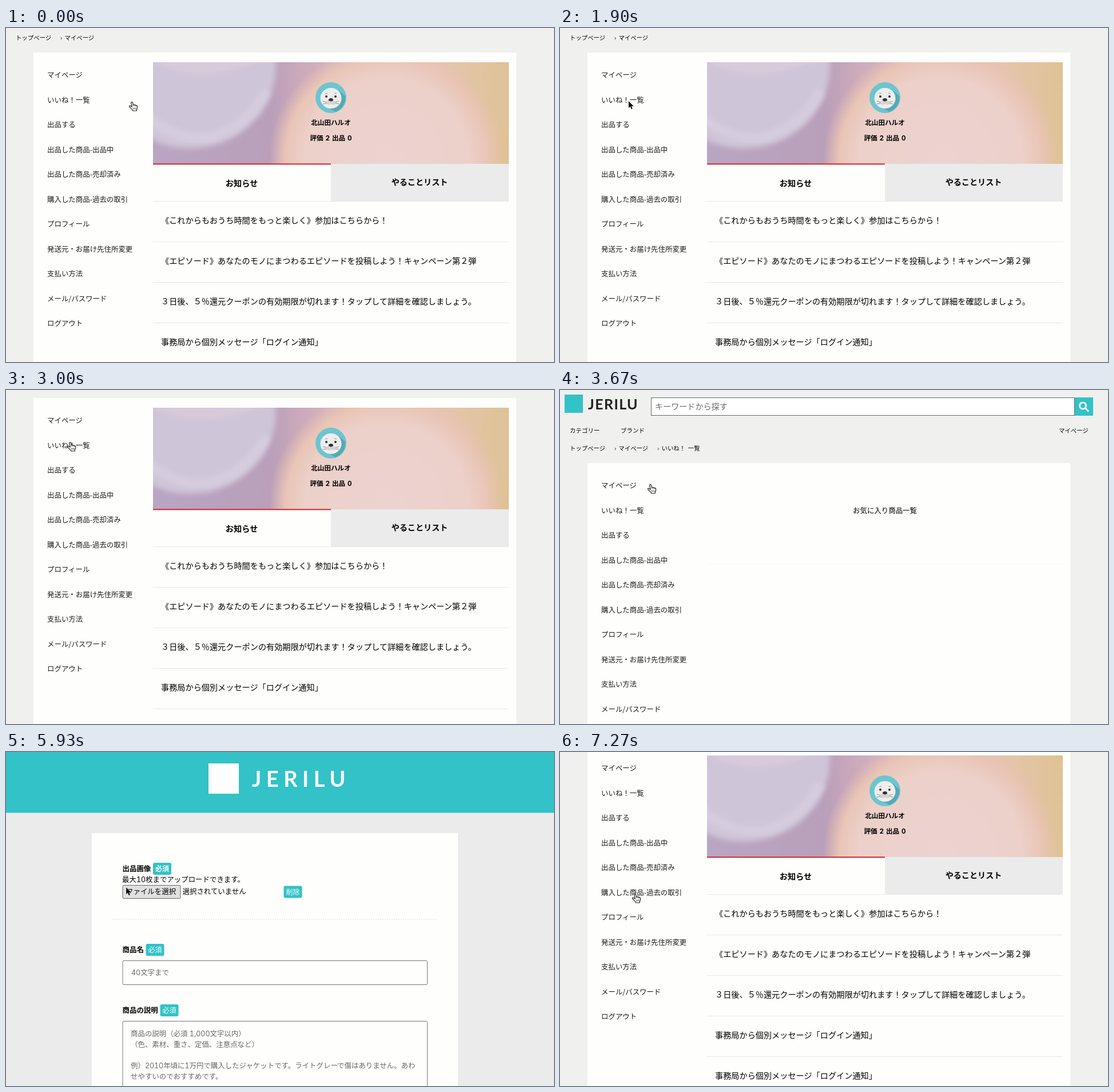
Recreate the animation shown at these times as an HTML page. Size 958 by 585 pixels, loop 7310 ms.

```html
<!DOCTYPE html>
<html lang="ja">
<head>
<meta charset="utf-8">
<title>マイページ</title>
<style>
  html, body { margin: 0; width: 100%; height: 100%; overflow: hidden; background: #f0f0ef; }
  svg { display: block; width: 958px; height: 585px; }
  text { font-family: "Noto Sans CJK JP", "Noto Sans CJK", sans-serif; text-spacing-trim: space-all; white-space: pre; }
  .num { font-family: Inter, "Noto Sans CJK JP", sans-serif; font-variant-numeric: tabular-nums; }
  .brand { font-family: Lato, sans-serif; font-weight: 700; }

  #site, #cursor { animation: 7310ms ease-in-out infinite; }
  #home, #likes, #sell, #unpainted, #hand, #arrow { animation: 7310ms step-end infinite; }
  #site { animation-name: scroll; }
  #cursor { animation-name: pointer; }
  #home { animation-name: home; }
  #likes { animation-name: likes; }
  #sell { animation-name: sell; }
  #unpainted { animation-name: unpainted; }
  #hand { animation-name: hand; }
  #arrow { animation-name: arrow; }

  @keyframes scroll {
    0%, 26% { transform: translateY(-85px); }
    29.1%, 43.1% { transform: translateY(-114px); }
    43.11%, 58.1% { transform: translateY(0); }
    61.3% { transform: translateY(-85px); }
    64.3%, 93% { transform: translateY(-113px); }
    98.5%, 100% { transform: translateY(-139px); }
  }
  @keyframes pointer {
    0% { transform: translate(220px, 130px); }
    13.7%, 21.2% { transform: translate(118px, 75px); }
    26%, 30.5% { transform: translate(120px, 128px); }
    36.9%, 43.8% { transform: translate(112px, 92px); }
    49.2%, 51.3% { transform: translate(158px, 166px); }
    53.4%, 58.1% { transform: translate(130px, 160px); }
    65.7%, 75.2% { transform: translate(100px, 140px); }
    80%, 86.9% { transform: translate(210px, 237px); }
    94.4%, 100% { transform: translate(131px, 249px); }
  }
  @keyframes home {
    0%, 54.7% { visibility: visible; }
    43.1% { visibility: hidden; }
  }
  @keyframes likes {
    0%, 54.7% { visibility: hidden; }
    43.1% { visibility: visible; }
  }
  @keyframes sell {
    0%, 86.9% { visibility: hidden; }
    75.2% { visibility: visible; }
  }
  @keyframes unpainted {
    0%, 30.1% { visibility: hidden; }
    26.2% { visibility: visible; }
  }
  @keyframes hand {
    0%, 34.2%, 88.9% { visibility: visible; }
    25.3%, 75.2% { visibility: hidden; }
  }
  @keyframes arrow {
    0%, 34.2%, 88.9% { visibility: hidden; }
    25.3%, 75.2% { visibility: visible; }
  }
</style>
</head>
<body>
<svg id="stage" viewBox="0 0 958 585"></svg>
<script>
const TEAL = '#32c2c7', PAPER = '#fefefd', GREY = '#ebebec', LINE = '#e9e9ee';

// Text placed by its left edge and vertical middle
const text = (x, mid, size, str, attrs = '') =>
  `<text x="${x}" y="${(mid + size * 0.38).toFixed(2)}" font-size="${size}" ${attrs}>${str}</text>`;
const rect = (x, y, w, h, fill, attrs = '') =>
  `<rect x="${x}" y="${y}" width="${w}" height="${h}" fill="${fill}" ${attrs}/>`;
const medium = 'font-weight="500"';
const bold = 'font-weight="700"';
const centred = bold + ' text-anchor="middle"';

const menu = ['マイページ', 'いいね！一覧', '出品する', '出品した商品-出品中', '出品した商品-売却済み',
  '購入した商品-過去の取引', 'プロフィール', '発送元・お届け先住所変更', '支払い方法',
  'メール/パスワード', 'ログアウト'];
const login = '事務局から個別メッセージ「ログイン通知」';
const news = ['《これからもおうち時間をもっと楽しく》参加はこちらから！',
  '《エピソード》あなたのモノにまつわるエピソードを投稿しよう！キャンペーン第２弾',
  '３日後、５％還元クーポンの有効期限が切れます！タップして詳細を確認しましょう。',
  login, login];

const header = `
  ${rect(8, 8, 32, 32, TEAL)}
  <text class="brand" x="49" y="34" font-size="25" letter-spacing="1.4" fill="#222">JERILU</text>
  ${rect(159.5, 13.5, 740, 31, '#fff', 'stroke="#666"')}
  ${text(166, 29, 14.1, 'キーワードから探す', 'fill="#6c6c6c"')}
  ${rect(900, 13, 32, 32, TEAL)}
  <g fill="none" stroke="#fff" stroke-width="2.8"><circle cx="914" cy="27.5" r="5.6"/><path d="M918 31.5L924 37.5"/></g>
  ${text(17, 71, 10.5, 'カテゴリー', medium)}
  ${text(106, 71, 10.5, 'ブランド', medium)}
  ${text(872, 71, 10.4, 'マイページ', medium)}
  ${text(17, 102, 10.4, 'トップページ', medium)}
  ${text(95, 102, 10.4, '›', medium)}
  ${text(102.5, 102, 10.4, 'マイページ', medium)}`;

const sidebar = menu.map((s, i) => text(72, 167.3 + i * 43.5, 12.45, s, 'fill="#1c1c1c"')).join('');

const banner = `
  <g clip-path="url(#bannerClip)">
    ${rect(257, 145, 622, 178, 'url(#bannerBase)')}
    <circle cx="665" cy="315" r="205" fill="url(#peach)"/>
    <ellipse cx="322" cy="152" rx="150" ry="144" fill="#cfc5d8" filter="url(#blur)"/>
    <path d="M240 130Q330 200 470 130V90H240Z" fill="#d8cada" filter="url(#blur)"/>
    <path d="M245 240Q300 282 350 278Q420 262 455 195" fill="none" stroke="#d5cddf" stroke-width="16" filter="url(#blur)"/>
  </g>`;

const avatar = `
  <g transform="translate(568 207)">
    <circle r="27" fill="#6cc5cf"/>
    <path d="M14 -12L25 -3A26 26 0 0 1 8 25L-9 15Z" fill="#54aab6"/>
    <ellipse cy="1" rx="18.5" ry="18" fill="#eeeeec"/>
    <g fill="#333">
      <circle cx="-8" cy="-2" r="2"/><circle cx="8" cy="-2" r="2"/>
      <ellipse cy="4" rx="4" ry="3"/>
    </g>
    <ellipse cx="-4" cy="9" rx="5" ry="3.6" fill="#d5d4d2"/><ellipse cx="4" cy="9" rx="5" ry="3.6" fill="#d5d4d2"/>
    <path d="M-8 8L-14 6M-8 10L-14 11M8 8L14 6M8 10L14 11M-10 -7L-6 -8M10 -7L6 -8" stroke="#777" stroke-width=".8"/>
  </g>`;

const home = `
  ${banner}${avatar}
  ${text(568, 250.5, 11.6, '北山田ハルオ', centred)}
  ${text(568, 277.5, 11.6, '評価 2 出品 0', centred + ' class="num" word-spacing=".8"')}
  ${rect(568, 323, 311, 66, GREY)}
  ${rect(257, 322.3, 311, 2, '#d3262c')}
  ${text(412, 357, 14.2, 'お知らせ', centred)}
  ${text(723, 355, 14.1, 'やることリスト', centred)}
  ${news.map((s, i) => rect(257, 388 + i * 71, 622, 1, LINE) + text(271, 422 + i * 71, 14.16, s)).join('')}
  ${rect(257, 743, 622, 1, LINE)}`;

const likes = `
  ${text(170, 102, 10.4, '›', medium)}
  ${text(177.5, 102, 10.4, 'いいね！ 一覧', medium + ' word-spacing="2.4"')}
  ${text(512, 211, 12.45, 'お気に入り商品一覧', medium)}
  ${rect(257, 304, 622, 1, '#f8f9ea')}`;

const badge = (x, y, str, attrs = '') =>
  rect(x, y, 32, 21, TEAL, 'rx="3"') + text(x + 16, y + 10.5, 12, str, 'fill="#fff" text-anchor="middle" ' + attrs);
const hint = (x, mid, str) => text(x, mid, 12.45, str, 'class="num" fill="#686868"');

const sell = `
  ${rect(0, 0, 958, 585, GREY)}
  ${rect(0, 0, 958, 106.5, TEAL)}
  ${rect(354, 20, 53, 53, '#fff')}
  <text class="brand" x="430" y="61" font-size="38" letter-spacing="8.5" fill="#fff">JERILU</text>
  ${rect(150, 142, 640, 443, PAPER)}
  ${text(203.5, 204, 12.45, '出品画像', bold)}${badge(257, 194, '必須', bold)}
  ${text(203, 223, 12.45, '最大10枚までアップロードできます。', 'class="num"')}
  ${rect(204, 233.5, 101, 23, '#e0e0e0', 'rx="2" stroke="#666"')}
  ${text(210, 244.5, 12.45, 'ファイルを選択')}
  ${text(308.5, 244.5, 12.45, '選択されていません')}${badge(485.5, 234.5, '削除')}
  <path d="M186 293H755" stroke="#dcdce2" stroke-dasharray="2 2"/>
  ${text(203.5, 346.5, 12.45, '商品名', bold)}${badge(244.5, 336, '必須')}
  ${rect(204, 365.5, 532.5, 42, PAPER, 'rx="2" stroke="#777"')}
  ${hint(219, 386, '40文字まで')}
  ${text(203.5, 452, 12.45, '商品の説明', bold)}${badge(269.5, 442, '必須')}
  ${rect(204, 471.5, 532.5, 160, PAPER, 'rx="2" stroke="#777"')}
  ${hint(218, 493.5, '商品の説明（必須 1,000文字以内）')}
  ${hint(218, 512, '（色、素材、重さ、定価、注意点など）')}
  ${hint(218, 549.5, '例）2010年頃に1万円で購入したジャケットです。ライトグレーで傷はありません。あわ')}
  ${hint(218, 568, 'せやすいのでおすすめです。')}`;

const cursor = `
  <g id="hand">
    <path d="M-1.3 1.2C-1.5-.6 1-.9 1.5.8L2.6 5C3 3.9 5 4 5.2 5.2C5.8 4.4 7.4 4.7 7.6 6C8.4 5.6 9.5 6.2 9.6 7.4C9.8 10 9.2 11.5 8.4 12.6L8.3 15H1.6L1.4 13.6C-.6 12-2.2 9.8-4 8.2C-5.2 7-3.8 5.6-2.3 6.4L.3 8.2Z"
      fill="#fff" stroke="#222" stroke-width="1.2" stroke-linejoin="round"/>
    <path d="M2.6 5L3 7.2M5.2 5.2L5.5 7.2M7.6 6L7.7 7.6M2.6 9.5V12.5M4.7 9.5V12.5M6.7 9.5V12.5" stroke="#222" stroke-width=".8"/>
  </g>
  <path id="arrow" d="M0 0V12.2L2.8 9.6 4.8 14.2 6.9 13.3 4.9 8.9H8.7Z" fill="#111" stroke="#fff" stroke-width="1" paint-order="stroke"/>`;

document.getElementById('stage').innerHTML = `
  <defs>
    <clipPath id="bannerClip">${rect(257, 145, 622, 178, '#000')}</clipPath>
    <filter id="blur"><feGaussianBlur stdDeviation="5"/></filter>
    <linearGradient id="bannerBase">
      <stop offset="0" stop-color="#b9a6c2"/><stop offset=".33" stop-color="#b99fba"/>
      <stop offset=".42" stop-color="#cdaabb"/><stop offset=".6" stop-color="#dfbec0"/>
      <stop offset=".82" stop-color="#e4c6ae"/><stop offset="1" stop-color="#dfc295"/>
    </linearGradient>
    <radialGradient id="peach">
      <stop offset="0" stop-color="#ecd3d1"/><stop offset=".7" stop-color="#ecd0c9"/>
      <stop offset=".86" stop-color="#e9c5b6"/><stop offset="1" stop-color="#e6c0b0" stop-opacity="0"/>
    </radialGradient>
  </defs>
  <g id="site">
    ${header}
    ${rect(48, 128, 844, 800, PAPER)}
    ${sidebar}
    <g id="home">${home}</g>
    <g id="likes">${likes}</g>
    <g id="unpainted">${rect(0, 671, 958, 60, PAPER)}</g>
  </g>
  <g id="sell">${sell}</g>
  <g id="cursor">${cursor}</g>`;
</script>
</body>
</html>
```
